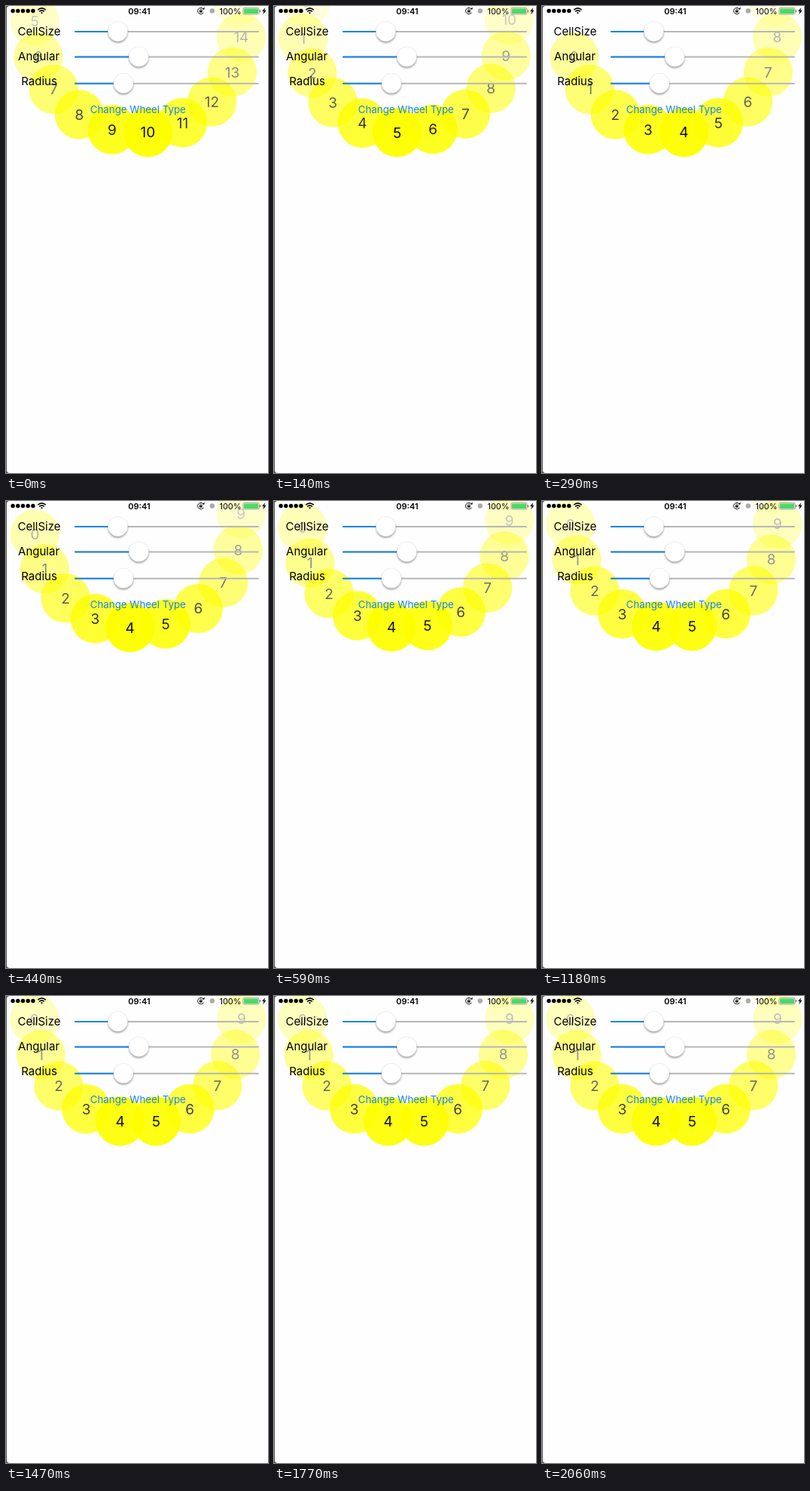
An HTML page for the animation above (2.31 s loop, 348 by 619 pixels).

```html
<!DOCTYPE html>
<html lang="en">
<head>
<meta charset="utf-8">
<title>Wheel layout</title>
<style>
  html, body { margin: 0; width: 100%; height: 100%; overflow: hidden; background: #fff; }
  svg { display: block; width: 348px; height: 619px; }
  text { font-family: Inter, Roboto, sans-serif; text-anchor: middle; }
  .label { font-size: 15px; }
  .status { font-size: 11px; }
  .cell { font-size: 19px; }
  .button { font-size: 13.3px; fill: #1784ea; }
  .knob { fill: #fff; stroke: #0002; stroke-width: .5; filter: drop-shadow(0 2px 1.3px #0005); }
</style>
</head>
<body>
<svg id="stage" viewBox="0 0 348 619">
  <rect width="348" height="619" fill="#555"/>
  <rect x="1" width="360" height="619" rx="4" fill="#fefefe"/>
  <g id="wheel"></g>
  <g id="controls"></g>
  <text class="button" x="175.3" y="142.3">Change Wheel Type</text>

  <g id="signal"></g>
  <g fill="none" stroke="#000" stroke-width="1.6">
    <path d="M42.3 5.2q5.2-4.6 10.4 0M44.2 7.3q3.3-2.9 6.6 0"/>
    <path d="M47.5 10.6l-1.7-1.8q1.7-1.3 3.4 0z" fill="#000" stroke="none"/>
  </g>
  <text class="status" x="177" y="10.5" font-weight="600">09:41</text>
  <g fill="none" stroke="#111">
    <path d="M262.2 4a4.2 4.2 0 1 0 .3 4.6"/>
    <path d="M260.6 4.4h3v-2.8z" fill="#111" stroke="none"/>
    <path d="M257.6 6v-.8a1.2 1.2 0 0 1 2.4 0V6" stroke-width=".7"/>
    <rect x="256.9" y="5.8" width="3.8" height="2.8" fill="#111" stroke="none"/>
  </g>
  <circle cx="273.8" cy="6.5" r="3.2" fill="#aaa"/>
  <text class="status" x="298" y="10.5">100%</text>
  <rect x="315" y="2.4" width="21" height="8.6" rx="1.6" fill="#fff" stroke="#777" stroke-width=".7"/>
  <rect x="316" y="3.4" width="19" height="6.6" rx=".8" fill="#4cd964"/>
  <path d="M336.8 5q1.5 0 1.5 1.7t-1.5 1.7z" fill="#777"/>
  <path d="M344.3 2l-4.1 5h2.2l-1.1 4.2 4.3-5.5h-2.4z"/>
</svg>
<script>
const LOOP = 2310;
const CENTER = { x: 175.3, y: 30.6 }, RADIUS = 137.5, CELL_RADIUS = 32.7;
const STEP_ANGLE = 20, FADE_ANGLE = 120;
const STEP_TIMES = [0, 140, 290, 440, 590, 740, 880, 1030];

function add(parent, tag, attributes, content = "") {
  const node = document.createElementNS("http://www.w3.org/2000/svg", tag);
  for (const [key, value] of Object.entries(attributes)) node.setAttribute(key, value);
  node.textContent = content;
  return parent.appendChild(node);
}

const controls = document.getElementById("controls");
function addSlider(name, labelX, baseline, y, knobX) {
  add(controls, "text", { class: "label", x: labelX, y: baseline }, name);
  add(controls, "rect", { x: 91, y: y - 1, width: 245, height: 2, rx: 1, fill: "#b7b7b7" });
  add(controls, "rect", { x: 91, y: y - 1, width: knobX - 91, height: 2, rx: 1, fill: "#1784ea" });
  add(controls, "circle", { class: "knob", cx: knobX, cy: y - .3, r: 13.2 });
}
addSlider("CellSize", 44, 38.7, 34, 148.5);
addSlider("Angular", 43.6, 71.7, 67.5, 176.4);
addSlider("Radius", 44, 104.8, 102.7, 156);

for (let i = 0; i < 5; i++) {
  add(document.getElementById("signal"), "circle", { cx: 9.1 + i * 6.7, cy: 6.5, r: 2.7 });
}

const cells = Array.from({ length: 17 }, (_, i) => {
  const cell = add(document.getElementById("wheel"), "g", {});
  add(cell, "circle", { r: CELL_RADIUS, fill: "#ff0" });
  add(cell, "text", { class: "cell", y: 7 }, i);
  return cell;
});

// Fling past the first cell, then spring back to the resting position.
function scrollPosition(step) {
  return step < 2 ? [9.725, 5.245][step] : 4.5 - .775 * .36 ** (step - 2);
}

function draw(now) {
  const time = now % LOOP;
  const position = scrollPosition(STEP_TIMES.filter(t => t <= time).length - 1);
  cells.forEach((cell, i) => {
    const degrees = (i - position) * STEP_ANGLE;
    const angle = degrees * Math.PI / 180;
    const x = CENTER.x + RADIUS * Math.sin(angle);
    const y = CENTER.y + RADIUS * Math.cos(angle);
    cell.setAttribute("transform", `translate(${x} ${y})`);
    cell.setAttribute("opacity", Math.max(0, 1 - Math.abs(degrees) / FADE_ANGLE));
  });
}

const start = performance.now();
function tick() {
  draw(performance.now() - start);
  requestAnimationFrame(tick);
}
tick();
</script>
</body>
</html>
```
